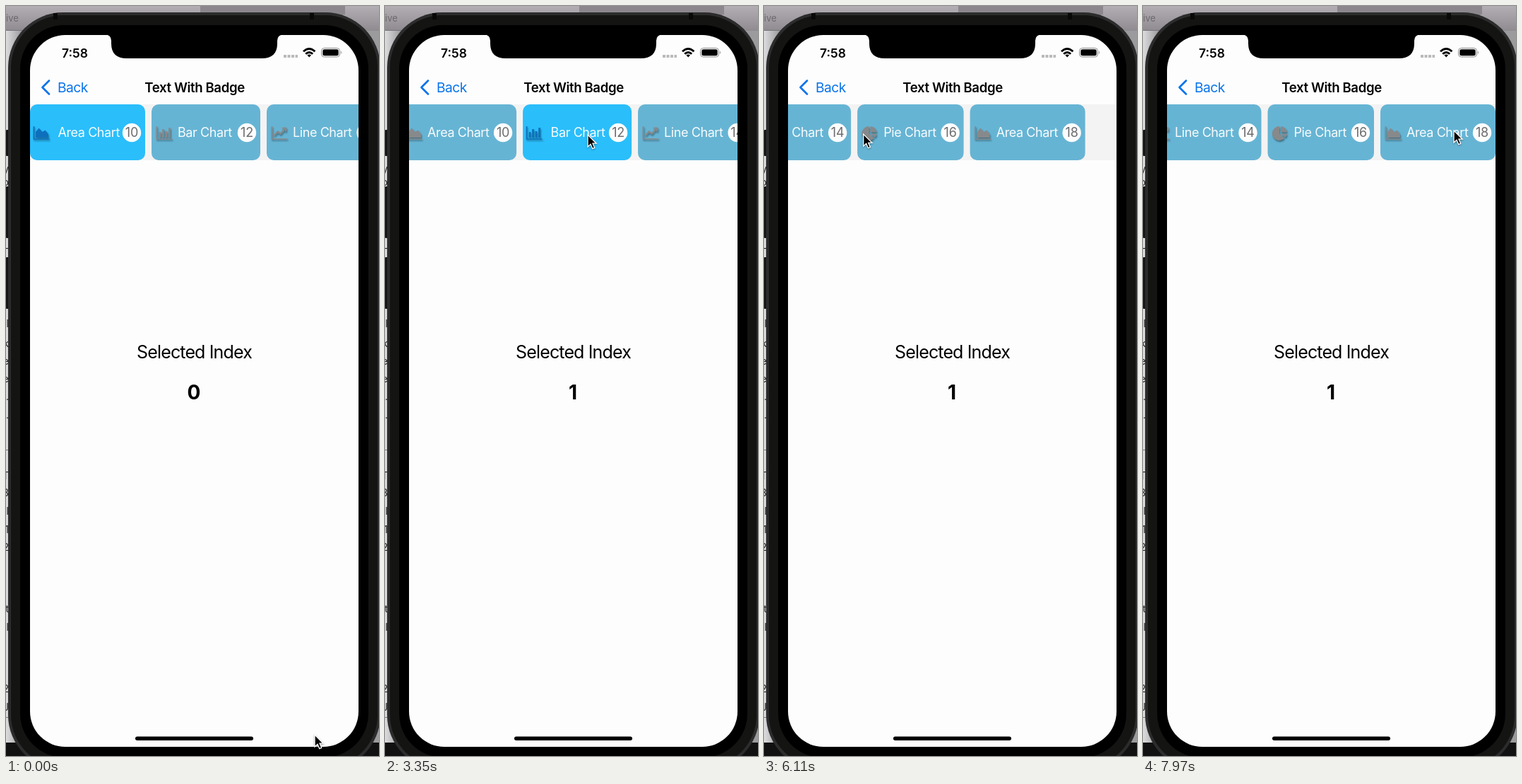
Animation of 528 by 1060 pixels, one loop 8 s. Source, as an HTML page:

```html
<!DOCTYPE html>
<html lang="en">
<head>
<meta charset="utf-8">
<title>Text With Badge</title>
<style>
  html, body { margin: 0; width: 100%; height: 100%; overflow: hidden; background: #888; }
  svg { display: block; }
  text { font-family: Inter, Roboto, sans-serif; }
  .label { font-size: 18px; letter-spacing: -.42px; fill: #f8fbfc; }
  .badge { font-size: 18px; letter-spacing: -.2px; fill: #6c6c6e; text-anchor: middle; }
  .icon { filter: drop-shadow(1px 2px 1px #0006); }
  .sliver { font-size: 14px; fill: #222; text-anchor: end; }
</style>
</head>
<body>
<svg id="stage" width="528" height="1060" viewBox="0 0 528 1060">
  <defs>
    <linearGradient id="edge">
      <stop offset="0" stop-color="#dcdcde"/>
      <stop offset="1" stop-color="#8a8a8c"/>
    </linearGradient>
    <linearGradient id="bar" x2="0" y2="1">
      <stop offset="0" stop-color="#b3aeb3"/>
      <stop offset="1" stop-color="#8f8b90"/>
    </linearGradient>
  </defs>

  <!-- desktop behind the phone -->
  <rect width="528" height="1060" fill="#9b9b9d"/>
  <rect width="28" height="1042" y="35" fill="url(#edge)"/>
  <rect width="528" height="35" fill="url(#bar)"/>
  <rect x="275" width="205" height="12" fill="#8b878c"/>
  <rect y="34" width="28" height="1" fill="#77747a"/>
  <rect y="627" width="6" height="1" fill="#777"/>
  <rect y="1005" width="20" height="1" fill="#777"/>
  <rect y="1041" width="528" height="19" fill="#111"/>
  <text x="0" y="22" font-size="13" fill="#6c696e">ive</text>
  <g id="slivers"></g>

  <!-- phone -->
  <g fill="#161616">
    <rect y="175" width="6" height="37" rx="1"/>
    <rect y="255" width="6" height="73" rx="1"/>
    <rect y="355" width="6" height="73" rx="1"/>
  </g>
  <rect x="3" y="9" width="527" height="1071" rx="78" fill="#2c2c2d"/>
  <rect x="7" y="13" width="519" height="1063" rx="74" fill="#141413"/>
  <rect x="20" y="27" width="493" height="1035" rx="62"/>
  <path d="M70 10v9M433 10v9" stroke="#090909" stroke-width="6"/>
  <rect x="34" y="41" width="465" height="1006" rx="50" fill="#fdfdfd"/>
  <path d="M140 40Q149 41 149 49V53Q149 74 171 74H362Q384 74 384 53V49Q384 41 393 40Z"/>

  <!-- status and navigation bars -->
  <text x="79" y="72.5" font-size="17.5" font-weight="600">7:58</text>
  <path d="M393 71H413" stroke="#bababc" stroke-width="4" stroke-dasharray="4 1.5"/>
  <g fill="none" stroke="#000" stroke-width="2.8">
    <path d="M421 64.3Q429.2 56.6 437.4 64.3M424.2 67.8Q429.2 63.2 434.2 67.8"/>
    <path d="M426.4 69.6Q429.2 67.4 432 69.6L429.2 72.6Z" fill="#000" stroke="none"/>
  </g>
  <rect x="446.5" y="59.5" width="26" height="12.5" rx="4" fill="none" stroke="#8c8c8c"/>
  <rect x="448.3" y="61.3" width="22.4" height="9" rx="2.5"/>
  <path d="M474 63.5q2 2.2 0 4.5z" fill="#8c8c8c"/>
  <path d="M61 105.5L51.5 115L61 124.5" fill="none" stroke="#0b74ea" stroke-width="2.7" stroke-linecap="round" stroke-linejoin="round"/>
  <text x="73" y="121.5" font-size="19.3" letter-spacing="-.6" fill="#0b74ea">Back</text>
  <text x="267" y="121.5" font-size="18.6" font-weight="600" letter-spacing="-.38" text-anchor="middle">Text With Badge</text>

  <!-- page -->
  <svg x="34" y="139" width="465" height="79">
    <rect width="465" height="79" fill="#f4f3f3"/>
    <g id="tabs"></g>
  </svg>
  <text x="266.5" y="498" font-size="25" letter-spacing="-.85" text-anchor="middle">Selected Index</text>
  <text id="index" x="266" y="555.5" font-size="28" font-weight="700" text-anchor="middle">0</text>
  <rect x="183" y="1032.5" width="167" height="5.5" rx="2.75"/>

  <path id="cursor" d="M0 0V17L4 13.3L6.7 19.6L9.7 18.3L7 12.2H12.2Z" stroke="#fff" stroke-width="1.3" style="filter:drop-shadow(0 1px 1px #0006)"/>
</svg>

<script>
const byId = id => document.getElementById(id);
const LOOP = 8000, SELECT_AT = 3150, GAP = 9;

const axes = '<path d="M1 0V18H23" fill="none" stroke="currentColor" stroke-width="1.7"/>';
const icons = {
  Area: axes + '<path d="M3.5 16V8L8 2.5L13 8L17 5.5L21.5 11V16Z" fill="currentColor"/>',
  Bar: axes + '<path d="M5.5 16V8M10 16V4M14.5 16V7M19 16V2" stroke="currentColor" stroke-width="2.7"/>',
  Line: axes + '<path d="M4 13L9 7.5L13 10.5L20 3M15.5 2.5H20.5V7.5" fill="none" stroke="currentColor" stroke-width="2.2"/>',
  Pie: '<path d="M10 10V0A10 10 0 1 0 17 17Z" fill="currentColor"/><path d="M12 8.5V0A9.5 9.5 0 0 1 21 8.5ZM12.5 10.5H21A10 10 0 0 1 18.5 16Z" fill="currentColor"/>'
};

const tabs = [['Area', 163, 10], ['Bar', 154, 12], ['Line', 159.5, 14], ['Pie', 150.5, 16], ['Area', 163, 18]];
let left = 0;
byId('tabs').innerHTML = tabs.map(([name, width, count]) => {
  const markup = `<g transform="translate(${left})">
    <rect class="face" width="${width}" height="79" rx="10"/>
    <g class="icon">${icons[name]}</g>
    <text class="label" y="46">${name} Chart</text>
    <circle cx="${width - 19}" cy="40" r="13.2" fill="#fdfdfd"/>
    <text class="badge" x="${width - 19}" y="46.3">${count}</text></g>`;
  left += width + GAP;
  return markup;
}).join('');
const tabNodes = [...byId('tabs').children];

// Line ends of the window that is mostly hidden by the phone
const lineEnds = { 235: 'y', 254: 'o', 347: '–', 454: 'l', 482: 'k', 507: 'e', 532: 'e', 557: '.', 583: '.', 669: 'T',
  693: '3', 719: 'l', 745: '1', 770: '2', 857: 't', 883: 'l', 970: '2', 996: 'J' };
byId('slivers').innerHTML = Object.entries(lineEnds)
  .map(([y, char]) => `<text class="sliver" x="4" y="${y}">${char}</text>`).join('');

const smooth = u => u * u * (3 - 2 * u);
const easeIn = u => u * u;
const easeOut = u => 1 - (1 - u) ** 2;

// Keys: [time, values, easing towards this key]
const cursorKeys = [
  [300, [437, 1030]],
  [1130, [243, 188]],
  [1650, [243, 188]],
  [2500, [287, 182]],
  [3450, [287, 182]],
  [4100, [422, 187]],
  [4960, [422, 187]],
  [5550, [137, 175], easeIn],
  [5720, [85, 174], easeOut],
  [5900, [85, 174]],
  [6540, [304, 202]],
  [6750, [304, 202]],
  [7450, [440, 176]]
];
const scrollKeys = [
  [SELECT_AT, [0]],
  [3480, [16.5]],
  [4960, [16.5]],
  [5550, [287], easeIn],
  [5900, [410], easeOut],
  [7011, [361]]
];

function sample(keys, time) {
  const next = keys.findIndex(key => key[0] > time);
  if (next === 0) return keys[0][1];
  if (next < 0) return keys.at(-1)[1];
  const [start, from] = keys[next - 1];
  const [end, to, ease = smooth] = keys[next];
  const u = ease((time - start) / (end - start));
  return from.map((value, i) => value + (to[i] - value) * u);
}

let shown = -1;
function select(index) {
  if (index === shown) return;
  shown = index;
  byId('index').textContent = index;
  tabNodes.forEach((tab, i) => {
    const active = i === index;
    const icon = tab.querySelector('.icon');
    tab.querySelector('.face').setAttribute('fill', active ? '#2abefb' : '#66b4d4');
    icon.setAttribute('color', active ? '#0d70bd' : '#87898b');
    icon.setAttribute('transform', `translate(${active ? 4.5 : 6.5} 31)`);
    tab.querySelector('.label').setAttribute('x', active ? 39.5 : 37);
  });
}

function draw(now) {
  const time = now % LOOP;
  select(time < SELECT_AT ? 0 : 1);
  byId('tabs').setAttribute('transform', `translate(${-sample(scrollKeys, time)[0]})`);
  byId('cursor').setAttribute('transform', `translate(${sample(cursorKeys, time)})`);
  requestAnimationFrame(draw);
}
draw(performance.now());
</script>
</body>
</html>
```
